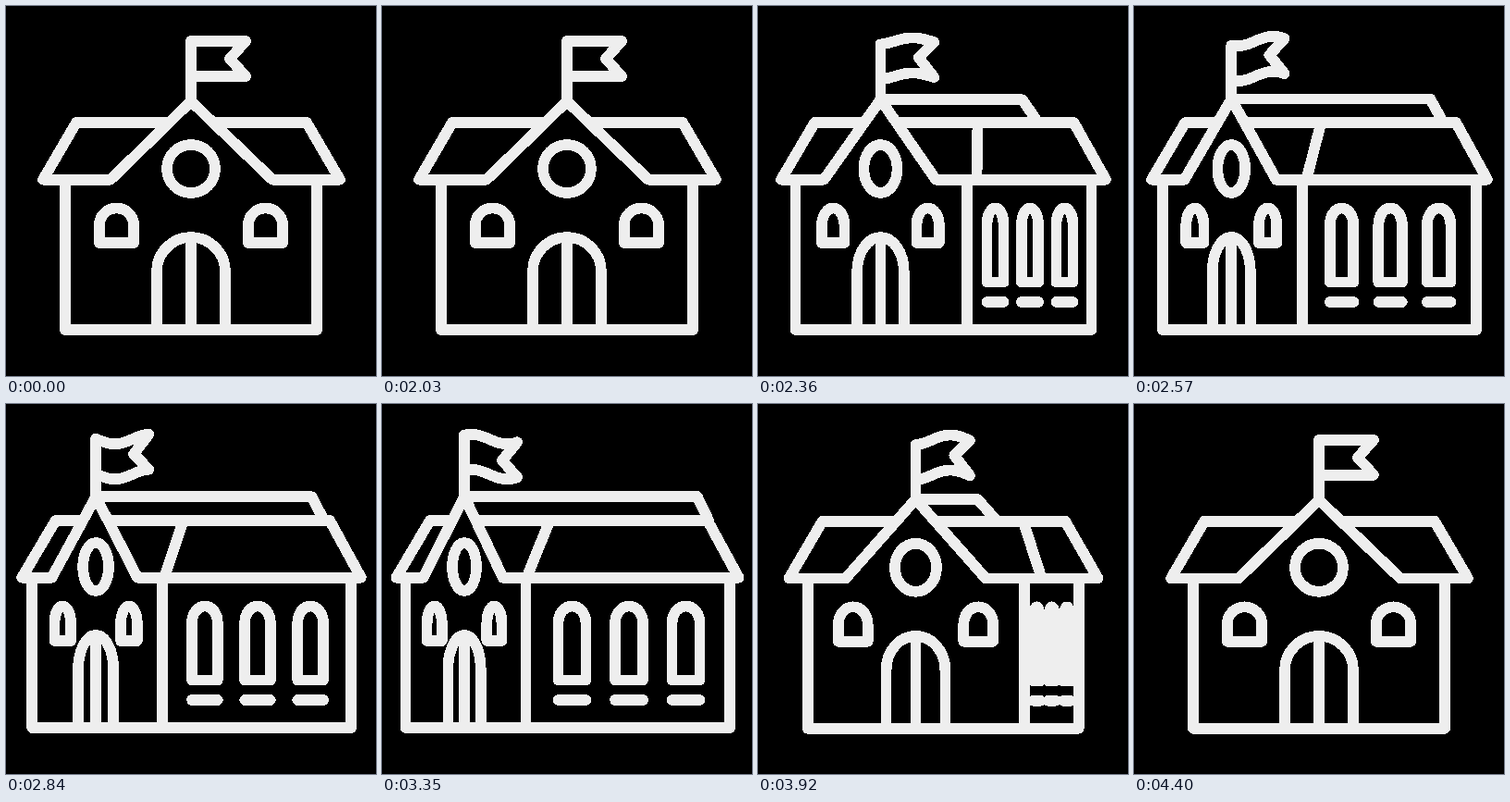
An HTML page for the animation above (4.43 s loop, 400 by 400 pixels).

```html
<!DOCTYPE html>
<html lang="en">
<head>
<meta charset="utf-8">
<title>School house</title>
<style>
html, body { margin: 0; width: 100%; height: 100%; overflow: hidden; background: #000; }
svg { display: block; width: 100vw; height: 100vh; }
path {
  fill: none; stroke: #eee; stroke-width: 11.7;
  stroke-linecap: round; stroke-linejoin: round; shape-rendering: crispEdges;
}
</style>
</head>
<body>
<svg viewBox="0 0 400 400"><path id="house"/></svg>
<script>
const LOOP = 4430;
const house = document.getElementById('house');

const ramp = (t, a, b) => Math.min(1, Math.max(0, (t - a) / (b - a)));
const smooth = (t, a, b) => { const u = ramp(t, a, b); return u * u * (3 - 2 * u); };

const line = (...pts) => 'M' + pts.map(q => q[0].toFixed(2) + ' ' + q[1].toFixed(2)).join('L');

// arched opening: centre x, half width, top, arch height, bottom
const arch = (x, w, top, h, bottom) =>
  `M${x - w} ${bottom}V${top + h}A${w} ${h} 0 0 1 ${x + w} ${top + h}V${bottom}Z`;

const oval = (x, y, rx, ry) =>
  `M${x - rx} ${y}a${rx} ${ry} 0 1 1 ${2 * rx} 0a${rx} ${ry} 0 1 1 ${-2 * rx} 0Z`;

// amount of turn: quick swing, slow drift, swing back
function turn(t) {
  const out = 0.815 * smooth(t, 2026, 2540);
  const drift = 0.15 * Math.sin(ramp(t, 2540, 3383) * Math.PI / 2);
  return (out + drift) * (1 - smooth(t, 3383, 4196));
}

// a wave travels from the pole to the tips
function flag(t, x, p, foot) {
  const amp = 5.3 * smooth(t, 2022, 2560) * (1 - smooth(t, 3920, 4390));
  const crest = 0.6 + (t - 2360) * 0.00089;
  const wave = u => -amp * Math.cos(2 * Math.PI * (u - crest) / 1.35);
  const w = 59 - 2 * p;
  const edge = y => Array.from({ length: 17 }, (_, i) => [x + w * i / 16, y + wave(i / 16)]);
  const notch = [x + w - 17 + p, 57 + (wave(0.71) + wave(1)) / 2];
  return line([x, foot], ...edge(38), notch, ...edge(76).reverse());
}

function draw(t) {
  const p = turn(t);
  const cx = 200 - 115 * p;
  const left = 64 - 40 * p, corner = 336 - 187 * p, right = 336 + 41.5 * p;
  const apex = 103 - 3 * p, eave = 187.7, ridge = 126;
  const gl = 113 - 71 * p, gr = 288 - 163 * p;
  const k = (ridge - apex) / (eave - apex);
  const backX = 200 + 146 * p;

  const parts = [
    flag(t, cx, p, apex),
    // roof
    line([cx, apex], [gl, eave], [40 - 25.5 * p, eave], [76 - 25 * p, ridge], [cx + (gl - cx) * k, ridge]),
    line([cx, apex], [gr, eave], [361 + 25.5 * p, eave], [325 + 28 * p, ridge], [cx + (gr - cx) * k, ridge]),
    line([325 - 149 * p, ridge], [361 - 212 * p, eave]),
    line([cx, apex], [backX, apex], [backX + (gr - cx) * k, ridge]),
    // walls
    line([left, eave], [left, 350], [right, 350], [right, eave]),
    line([corner, eave], [corner, 350]),
    // front
    oval(cx, 176, 26 - 13.5 * p, 26),
    arch(cx, 37 - 20 * p, 250, 37, 350),
    line([cx, 250], [cx, 350])
  ];
  for (const side of [-1, 1])
    parts.push(arch(cx + side * 80.5 * (1 - 0.62 * p), 18.7 - 11 * p, 218.5, 18.7, 256));

  // side wall
  if (p > 0.002) {
    const w = 15.5 * p;
    for (const i of [-1, 0, 1]) {
      const x = 336 + (63.8 * i - 71.5) * p;
      parts.push(arch(x, w, 218.5, 18, 298.5), line([x - w, 320], [x + w, 320]));
    }
  }
  house.setAttribute('d', parts.join(''));
  house.setAttribute('transform', `translate(0 ${0.8 * smooth(t, 3600, 3900)})`);
}

const start = performance.now();
function tick() {
  draw((performance.now() - start) % LOOP);
  requestAnimationFrame(tick);
}
draw(0);
requestAnimationFrame(tick);
</script>
</body>
</html>
```
